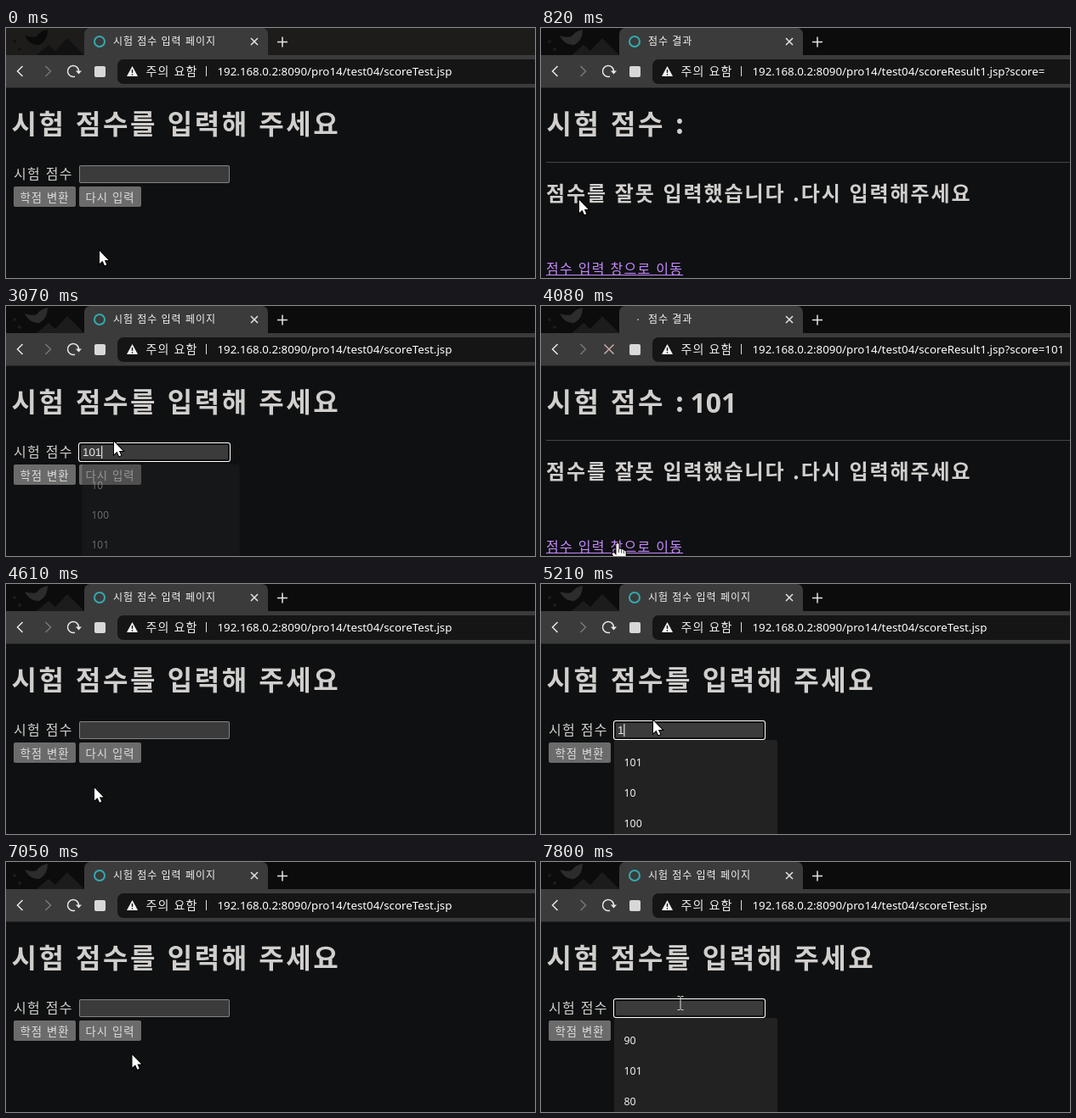
Animation of 622x295 px, one loop 8000 ms. Source, as an HTML page with a canvas:

```html
<!DOCTYPE html>
<html lang="ko">
<head>
<meta charset="utf-8">
<style>
html, body { margin: 0; width: 100%; height: 100%; overflow: hidden; background: #0f1011; }
canvas { display: block; }
</style>
</head>
<body>
<canvas id="stage" width="622" height="295"></canvas>
<script>
const c = document.getElementById('stage').getContext('2d');
const LOOP = 8000, STEP = 70;
const HANGUL = '"Noto Sans CJK KR", "Noto Sans KR", "Noto Sans CJK", sans-serif';
const LATIN = '"Noto Sans", "Open Sans", sans-serif';
const FIELD = '"Liberation Sans", Arial, sans-serif';
const INK = '#d0cfcd';

// start time, page, typed text or score, suggestions
const states = [
  [0, 'form'],
  [620, 'result', ''],
  [1650, 'form'],
  [2210, 'focus', '', '90 80 10'],
  [2750, 'focus', '1', '10 100 101'],
  [2890, 'focus', '10', '10 100 101'],
  [2980, 'focus', '101', '10 100 101'],
  [3270, 'result', '101'],
  [4150, 'form'],
  [4690, 'focus', '', '90 101 80'],
  [5210, 'focus', '1', '101 10 100'],
  [5410, 'focus', '10', '101 10 100'],
  [5820, 'focus', '100', '101 10 100'],
  [6030, 'result', '100'],
  [6920, 'form'],
  [7190, 'focus', '', '90 101 80'],
];
const loads = states.filter((s, i) => i && s[1] !== 'focus').map(s => s[0]);
const popups = [[2280, 3160], [4760, 5960], [7260, 9000]];

// start and end time, destination, pointer
const moves = [
  [0, 0, 110, 263, 'arrow'],
  [70, 70, 110, 263, 'none'],
  [270, 480, 45, 203, 'arrow'],
  [1230, 1370, 75, 262, 'arrow'],
  [1440, 1510, 85, 281, 'hand'],
  [1720, 1860, 80, 227, 'arrow'],
  [1930, 2000, 75, 200, 'arrow'],
  [2070, 2140, 110, 182, 'arrow'],
  [2210, 2210, 127, 160, 'beam'],
  [2750, 2750, 127, 160, 'arrow'],
  [3740, 3740, 127, 160, 'none'],
  [3880, 3950, 90, 280, 'hand'],
  [4550, 4620, 118, 201, 'arrow'],
  [4690, 4690, 132, 161, 'beam'],
  [5210, 5210, 132, 161, 'arrow'],
  [6500, 6500, 141, 249, 'hand'],
  [6570, 6640, 142, 250, 'hand'],
  [6990, 7060, 155, 205, 'arrow'],
  [7130, 7190, 164, 166, 'beam'],
];

function text(s, x, y, size, color = INK, weight = 400, family = HANGUL) {
  const spaced = family === HANGUL;
  c.font = `${weight} ${size}px ${family}`;
  c.letterSpacing = spaced ? size * 0.08 + 'px' : '0px';
  c.wordSpacing = spaced ? size * 0.055 + 'px' : '0px';
  c.fillStyle = color;
  c.fillText(s, x, y);
}

function rect(x, y, w, h, fill, r = 0) {
  c.fillStyle = fill;
  c.beginPath();
  c.roundRect(x, y, w, h, r);
  c.fill();
}

function line(path, color, width = 1.5) {
  c.strokeStyle = color;
  c.lineWidth = width;
  c.stroke(new Path2D(path));
}

function shape(path, color) {
  c.fillStyle = color;
  c.fill(new Path2D(path));
}

function drawTheme(pale) {
  const [back, hills, bird] = pale ? ['#1d1c1a', '#111112', '#0a0a0b'] : ['#0c0c0d', '#1c1c1d', '#2c2c2d'];
  rect(0, 0, 622, 32, back);
  shape('M36 32L50 20L58 27L72 12L92 32M8 16a2 2 0 1 0 4 0a2 2 0 1 0-4 0M14 25a2 2 0 1 0 4 0a2 2 0 1 0-4 0', hills);
  shape('M22 9Q30 12 36 10Q41 3 49 2Q49 15 39 20Q28 21 22 9', bird);
}

function drawChrome(isResult, score, loading) {
  rect(0, 32, 622, 38.5, '#3b3b3b');
  rect(92, 0, 216, 33, '#3b3b3b', [7, 7, 0, 0]);
  if (loading) rect(113, 15, 2, 2, '#aaa', 1);
  else line('M104 16a6 6 0 1 0 12 0a6 6 0 1 0-12 0', '#35a9ae', 2);
  text(isResult ? '점수 결과' : '시험 점수 입력 페이지', 126, 20, 12, '#f2f2f2');
  line('M288 12l8 8M296 12l-8 8M319 16.5h12M325 10.5v12', '#e4e4e4');

  line('M19.5 45l-6 6l6 6', '#e8e8e8');
  line('M46.5 45l6 6l-6 6', '#777');
  if (loading) line('M74.5 45.5l11 11M85.5 45.5l-11 11', '#c9a9a9');
  else {
    line('M81 57.2A6.5 6.5 0 1 1 85.5 51', '#e8e8e8');
    shape('M82 50.5h7l-3.5 4z', '#e8e8e8');
  }
  rect(104, 45, 13, 13, '#d8d8d8', 2);

  rect(131, 37, 520, 29, '#151516', 7);
  shape('M148.5 45l6.5 12h-13z', '#f4f4f4');
  line('M148.5 49v4M148.5 54.3v1.4', '#151516', 1.4);
  text('주의 요함', 164.5, 56, 14, '#f0f0f0');
  rect(235, 45, 1, 12, '#ddd');
  const page = isResult ? 'scoreResult1.jsp?score=' + score : 'scoreTest.jsp';
  text('192.168.0.2:8090/pro14/test04/' + page, 248.5, 56, 13.3, '#fff', 400, LATIN);
}

function drawResult(score) {
  const valid = score === '100', link = '점수 입력 창으로 이동', violet = '#c58aff';
  text('시험 점수 :', 6.5, 125, 32, INK, 700);
  text(score, 175.5, 126, 32, INK, 700, LATIN);
  rect(6, 158, 616, 1, '#454647');
  text(valid ? 'A 학점 입니다' : '점수를 잘못 입력했습니다 .다시 입력해주세요', 6, 204, 24, INK, 700);
  if (valid) {
    text(link, 6, 268, 24, violet, 700);
    rect(6, 271, 241, 2, violet);
  } else {
    text(link, 6, 290, 16, violet);
    rect(6, 291, 161, 1, violet);
  }
}

function drawButton(label, x, pointer) {
  const hover = pointer.x > x && pointer.x < x + 73 && pointer.y > 187 && pointer.y < 211;
  rect(x, 187, 73, 24, hover ? '#7b7b7b' : '#6b6b6b', 2);
  text(label, x + 7.5, 204.5, 13.33, '#dededc');
}

function drawForm(t, [since, mode, typed = '', list], pointer) {
  text('시험 점수를 입력해 주세요', 6.5, 125, 32, INK, 700);
  text('시험 점수', 9, 178, 16);
  drawButton('학점 변환', 9, pointer);
  drawButton('다시 입력', 86, pointer);
  if (mode !== 'focus') {
    rect(86, 162, 177, 21, '#858585', 2);
    rect(87, 163, 175, 19, '#3b3b3b', 1);
    return;
  }
  rect(85, 161, 179, 23, '#fff', 3);
  rect(86, 162, 177, 21, '#101010', 2);
  rect(88, 164, 173, 17, '#3b3b3b', 1);
  text(typed, 90, 177, 13.333, '#e6e6e6', 400, FIELD);
  if (t - since < 610) rect(90 + typed.length * 7.41, 165, 1, 15, '#fff');

  const open = popups.find(([a, b]) => t >= a && t < b);
  if (!open) return;
  const fading = t < open[0] + STEP || t >= open[1] - 90;
  c.save();
  if (fading) {
    c.globalAlpha = 0.38;
    c.translate(182, 262);
    c.scale(0.965, 0.965);
    c.translate(-182, -262);
  }
  rect(86, 184, 192, 130, '#222223', 3);
  list.split(' ').forEach((s, i) => text(s, 97.5, 214.5 + 36 * i, 12.4, '#f0f0f0', 400, LATIN));
  c.restore();
}

function pointerAt(t) {
  const i = moves.findLastIndex(m => t >= m[0]);
  const [start, end, x, y, kind] = moves[i];
  const [, , px, py] = moves[Math.max(0, i - 1)];
  const steps = Math.round((end - start) / STEP) + 1;
  const p = Math.min(1, (Math.floor((t - start) / STEP) + 1) / steps);
  return { x: px + (x - px) * p, y: py + (y - py) * p, kind };
}

const pointers = {
  arrow: 'M0 0V15L3.5 11.8L6 17.3L8.3 16.3L5.9 11H10.6Z',
  hand: 'M-1.5 1Q0-1 1.5 1V7Q3.5 5.5 4.5 7.8Q6.5 6.5 7.3 8.8Q9.5 8 9.7 10.5V15Q9 18 7.5 20V22H-1.5V20Q-4 17-6 13Q-6.5 10.5-4.3 11L-1.5 14Z',
};

function drawPointer({ x, y, kind }) {
  if (kind === 'none') return;
  c.save();
  c.translate(x, y);
  if (kind === 'beam') {
    line('M-3.5-7.5H-1L0-6.5L1-7.5H3.5M0-6.5V7.5M-3.5 8.5H-1L0 7.5L1 8.5H3.5', '#d8d8d8', 1);
  } else {
    line(pointers[kind], '#000', 2);
    shape(pointers[kind], '#fff');
    if (kind === 'hand') line('M1.5 7V11M4.5 8V11.5M7.3 9V12', '#222', 0.8);
  }
  c.restore();
}

function draw(t) {
  const state = states.findLast(s => t >= s[0]);
  const isResult = state[1] === 'result';
  const loading = loads.some(at => t >= at - STEP && t < at + STEP);
  const pointer = pointerAt(t);
  rect(0, 0, 622, 295, '#0f1011');
  drawTheme(state === states[0]);
  drawChrome(isResult, state[2], loading);
  if (isResult) drawResult(state[2]);
  else drawForm(t, state, pointer);
  drawPointer(pointer);
}

let began;
function tick(now) {
  began ??= now;
  draw((now - began) % LOOP);
  requestAnimationFrame(tick);
}
requestAnimationFrame(tick);
</script>
</body>
</html>
```
